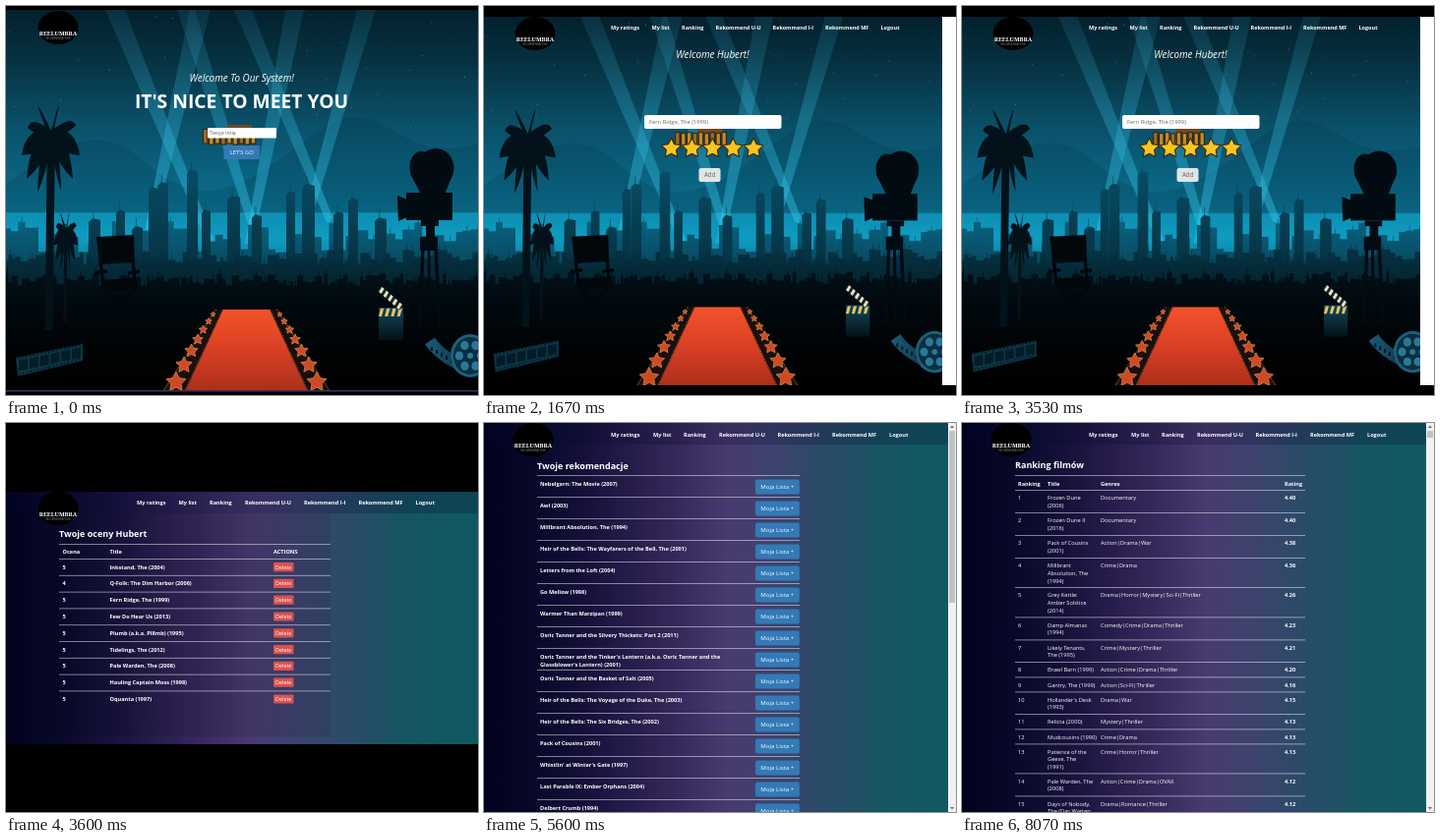
Write an HTML page with a canvas that moves like this. It is 480x396 px and loops after 8390 ms.

```html
<!DOCTYPE html>
<html lang="en">
<head>
<meta charset="utf-8">
<title>Film recommender demo</title>
<style>
html, body { margin: 0; width: 100%; height: 100%; overflow: hidden; background: #000; }
canvas { display: block; }
</style>
</head>
<body>
<canvas id="stage" width="480" height="396"></canvas>
<script>
const ctx = document.getElementById('stage').getContext('2d');
const LOOP = 8390;
const SANS = '"Open Sans", "Noto Sans", sans-serif';
const SERIF = '"Noto Serif", "Liberation Serif", serif';
const BLUE = '#337ab7';

function rect(x, y, w, h, color) {
  ctx.fillStyle = color;
  ctx.fillRect(x, y, w, h);
}

function box(x, y, w, h, r, color) {
  ctx.fillStyle = color;
  ctx.beginPath();
  ctx.roundRect(x, y, w, h, r);
  ctx.fill();
}

function poly(pts, color) {
  ctx.fillStyle = color;
  ctx.beginPath();
  for (let i = 0; i < pts.length; i += 2) ctx.lineTo(pts[i], pts[i + 1]);
  ctx.closePath();
  ctx.fill();
}

function disc(x, y, rx, ry, color) {
  ctx.fillStyle = color;
  ctx.beginPath();
  ctx.ellipse(x, y, rx, ry, 0, 0, 7);
  ctx.fill();
}

function line(pts, width, color) {
  ctx.strokeStyle = color;
  ctx.lineWidth = width;
  ctx.beginPath();
  for (let i = 0; i < pts.length; i += 2) ctx.lineTo(pts[i], pts[i + 1]);
  ctx.stroke();
}

function text(str, x, y, size, style = '', color = '#fff', align = 'left', family = SANS) {
  ctx.font = `${style} ${size}px ${family}`;
  ctx.fillStyle = color;
  ctx.textAlign = align;
  ctx.fillText(str, x, y);
}

function ramp(x0, y0, x1, y1, stops) {
  const g = ctx.createLinearGradient(x0, y0, x1, y1);
  for (const [at, color] of stops) g.addColorStop(at, color);
  return g;
}

function star(x, y, r, color, edge, width) {
  ctx.beginPath();
  for (let i = 0; i < 10; i++) {
    const a = i * Math.PI / 5 - Math.PI / 2, d = i % 2 ? r * 0.5 : r;
    ctx.lineTo(x + d * Math.cos(a), y + d * Math.sin(a));
  }
  ctx.closePath();
  ctx.lineJoin = 'round';
  ctx.fillStyle = color;
  ctx.strokeStyle = edge;
  ctx.lineWidth = width;
  ctx.fill();
  ctx.stroke();
}

function rng(seed) {
  return () => (seed = seed * 16807 % 2147483647) / 2147483647;
}

function logo(x, y) {
  disc(x, y, 20.5, 17, '#000');
  text('REELUMBRA', x, y + 8, 5.9, 'bold', '#fff', 'center', SERIF);
  text('RECOMMENDATIONS', x, y + 12, 2.6, '', '#888', 'center');
}

function nav(xs, y, size) {
  const items = ['My ratings', 'My list', 'Ranking', 'Rekommend U-U',
    'Rekommend I-I', 'Rekommend MF', 'Logout'];
  items.forEach((s, i) => text(s, xs[i], y, size, 'bold'));
}

// ---- night city backdrop, in 480 x 396 coordinates ----

function sky() {
  rect(0, 4, 480, 388, ramp(0, 4, 0, 392, [[0, '#03202d'], [0.12, '#06303f'],
    [0.3, '#0a5069'], [0.53, '#0b7191'], [0.534, '#0d8fb3'], [0.6, '#0f9cc1'],
    [0.68, '#0b7896'], [1, '#000']]));
  const r = rng(77);
  for (let i = 0; i < 45; i++)
    rect(r() * 480, 8 + r() * 120, 0.9, 0.9, `rgba(170,220,235,${0.15 + r() * 0.5})`);

  ctx.fillStyle = 'rgba(3,50,70,.22)';
  ctx.beginPath();
  ctx.moveTo(0, 180);
  ctx.bezierCurveTo(25, 165, 60, 133, 100, 137);
  ctx.bezierCurveTo(140, 142, 150, 185, 205, 188);
  ctx.bezierCurveTo(265, 185, 310, 118, 352, 113);
  ctx.bezierCurveTo(395, 112, 410, 160, 480, 140);
  ctx.lineTo(480, 210);
  ctx.lineTo(0, 210);
  ctx.fill();
}

function beams() {
  const light = ramp(0, 4, 0, 245, [[0, 'rgba(50,160,195,.13)'],
    [0.4, 'rgba(50,180,215,.3)'], [1, 'rgba(50,200,235,.5)']]);
  const rays = [[101, 121, 208, 240], [187, 208, 143, 238], [174, 192, 256, 240],
    [284, 303, 247, 242], [232, 250, 330, 220], [357, 376, 306, 218]];
  for (const [a, b, x, y] of rays) poly([a, 4, b, 4, x + 4, y, x - 4, y], light);
}

// A jagged row of roofs from edge to edge.
function roofs(seed, width, top, drop, color) {
  const r = rng(seed);
  for (let x = 0; x < 480;) {
    const w = width * (0.4 + r()), y = top + r() * drop;
    rect(x, y, w + 0.4, 300 - y, color);
    if (r() > 0.6) rect(x + w / 2, y - 5, 0.8, 6, color);
    x += w;
  }
}

function skyline() {
  roofs(2024, 11, 219, 32, ramp(0, 210, 0, 270, [[0, '#0a6684'], [1, '#07465d']]));
  const tall = [[84, 12, 216], [112, 9, 207], [128, 11, 224], [145, 9, 184], [154, 11, 179],
    [184, 11, 166], [199, 9, 207], [225, 13, 193], [250, 10, 212], [285, 9, 188],
    [301, 13, 181], [333, 10, 209], [348, 10, 195], [375, 12, 215]];
  const wall = ramp(0, 165, 0, 275, [[0, '#084c66'], [1, '#05303f']]);
  for (const [x, w, top] of tall) {
    poly([x, 290, x, top + 4, x + w * 0.35, top, x + w, top + 2, x + w, 290], wall);
    line([x + w * 0.4, top, x + w * 0.4, top - 8], 0.7, '#084c66');
  }
  roofs(515, 6, 247, 16, ramp(0, 245, 0, 290, [[0, '#053444'], [1, '#04212d']]));
  roofs(99, 5, 272, 13, ramp(0, 270, 0, 300, [[0, '#021119'], [1, '#010a10']]));
  rect(0, 296, 480, 96, ramp(0, 296, 0, 392, [[0, '#010a10'], [0.5, '#010406'], [1, '#000']]));
}

function palm(x, y, sx, sy, trunk) {
  const dark = '#03121a';
  ctx.save();
  ctx.translate(x, y);
  ctx.scale(sx, sy);
  poly([-4, 0, 4, 0, 1.5, trunk, -6.5, trunk], dark);
  const tips = [-30, 22, -25, 46, -14, 60, -24, -6, -14, -28, 8, -29, 25, -8, 29, 22, 22, 46, 10, 58];
  ctx.fillStyle = dark;
  for (let i = 0; i < tips.length; i += 2) {
    const a = tips[i], b = tips[i + 1];
    ctx.beginPath();
    ctx.moveTo(0, -3);
    ctx.quadraticCurveTo(a * 0.85, b * 0.4 - 17, a, b);
    ctx.quadraticCurveTo(a * 0.4, b * 0.55 + 8, 0, 12);
    ctx.fill();
  }
  ctx.restore();
}

function chair() {
  const c = '#01070b';
  poly([92, 235, 130, 233, 131, 261, 95, 263], c);
  line([96, 260, 99, 284], 3.4, c);
  line([129, 258, 131, 284], 3.4, c);
  line([90, 272, 103, 270], 3.5, c);
  line([124, 272, 136, 270], 3.5, c);
  poly([96, 279, 133, 277, 134, 288, 98, 290], c);
  line([100, 288, 130, 320], 2.8, c);
  line([131, 288, 101, 320], 2.8, c);
}

function camera() {
  const c = '#020b12';
  disc(437, 165, 18.5, 20, c);
  disc(422, 164, 11.5, 16, c);
  poly([411, 170, 454, 172, 446, 192, 422, 192], c);
  rect(407, 190, 47, 28, c);
  poly([398, 193, 408, 197, 408, 215, 399, 219], c);
  rect(422, 218, 18, 6, c);
  rect(427, 222, 9, 16, c);
  rect(421, 235, 18, 14, c);
  line([424, 246, 421, 326], 3.5, c);
  line([430, 246, 431, 326], 3, c);
  line([437, 246, 441, 326], 3.5, c);
}

function props() {
  // clapperboard
  rect(379, 307, 25, 33, ramp(0, 307, 0, 340, [[0, '#12485c'], [1, '#041117']]));
  for (let i = 0; i < 4; i++) {
    const x = 379 + i * 6.2;
    poly([x + 2, 308, x + 5.2, 308, x + 3, 316, x, 316], '#e6c463');
  }
  ctx.save();
  ctx.translate(381, 286);
  ctx.rotate(0.72);
  rect(0, -1, 30, 6, '#17242a');
  for (let i = 0; i < 5; i++) poly([i * 6 + 1, -1, i * 6 + 4, -1, i * 6 + 5, 5, i * 6 + 2, 5], '#ebe4c4');
  ctx.restore();

  // film strip
  poly([10, 358, 78, 344, 78, 361, 12, 377], '#0b3747');
  for (let i = 0; i < 6; i++) {
    const x = 13 + i * 10.8, y = 361 - i * 2.3;
    poly([x, y, x + 9, y - 1.9, x + 9, y + 8.5, x, y + 10.5], '#041c27');
  }
  for (let i = 0; i < 17; i++) {
    rect(12 + i * 3.9, 358.3 - i * 0.83, 1.6, 1.3, '#02121a');
    rect(13 + i * 3.8, 374 - i * 0.92, 1.6, 1.3, '#02121a');
  }

  // film reel with a loose end
  ctx.strokeStyle = ramp(428, 0, 470, 0, [[0, '#1a5a76'], [1, '#0c3040']]);
  ctx.lineWidth = 12;
  ctx.beginPath();
  ctx.moveTo(431, 341);
  ctx.quadraticCurveTo(446, 362, 480, 372);
  ctx.stroke();
  for (let i = 0; i < 8; i++) rect(432 + i * 5, 347 + i * 3, 2, 4, '#04161f');
  disc(472, 356, 20, 22, '#1c5f7a');
  disc(472, 356, 17, 19, '#0a2f40');
  for (let i = 0; i < 6; i++)
    disc(472 + 11 * Math.cos(i * 1.047), 356 + 12 * Math.sin(i * 1.047), 4.2, 4.6, '#2b7896');
  disc(472, 356, 3, 3, '#2b7896');
}

function carpet() {
  const edge = '#1a0f10', gold = '#a5602b';
  for (const m of [1, -1]) {
    const X = d => 244.5 - m * d;
    poly([X(23), 309, X(31), 309, X(84), 391, X(61), 391], edge);
    ctx.setLineDash([1.2, 1.2]);
    line([X(31), 309, X(84), 391], 1.2, gold);
    line([X(24), 309, X(62), 391], 1.2, gold);
    ctx.setLineDash([]);
    const spots = [[71.5, 383, 10.5], [63.5, 365.5, 8.6], [56, 351, 7], [49.5, 339.5, 5.6],
      [44, 329.5, 4.4], [38.5, 321, 3.4], [34, 314, 2.6]];
    for (const [d, y, r] of spots) star(X(d), y, r, '#cf4a24', '#d98a48', 0.8);
  }
  poly([221, 309, 268, 309, 306, 391, 183, 391],
    ramp(0, 309, 0, 391, [[0, '#f4522a'], [0.5, '#d84024'], [1, '#ae2f1a']]));
}

function sign() {
  rect(224, 121, 26, 5, '#6d4a25');
  for (let i = 0; i < 9; i++) {
    rect(200 + i * 6.1, 125 + i % 2, 5.6, 15.5, '#33230f');
    rect(201 + i * 6.1, 126 + i % 2, 3.4, 13.5, i % 3 ? '#c48a2a' : '#a06a22');
  }
}

function city() {
  ctx.save();
  ctx.beginPath();
  ctx.rect(0, 4, 480, 387);
  ctx.clip();
  sky();
  beams();
  skyline();
  palm(46, 130, 1, 1, 200);
  palm(61, 229, 0.42, 0.66, 140);
  chair();
  camera();
  props();
  carpet();
  sign();
  ctx.restore();
}

// ---- pages ----

function welcome() {
  city();
  rect(0, 391, 480, 1.6, '#3a2f63');
  logo(53, 22);
  text('Welcome To Our System!', 239.7, 77, 9.9, 'italic', '#fff', 'center');
  text("IT'S NICE TO MEET YOU", 239.5, 104, 19.3, 'bold', '#fff', 'center');
  box(205, 124, 70, 10.5, 1, '#fff');
  text('Twoje imię', 207, 131, 5.4, '', '#666');
  box(221.5, 142, 36.5, 14, 1.5, BLUE);
  text("LET'S GO", 239.7, 151, 5.8, '500', '#fff', 'center');
}

function rate() {
  ctx.save();
  ctx.translate(0, 11 - 4 * 0.969);
  ctx.scale(466 / 480, 0.969);
  city();
  ctx.restore();
  rect(466, 11, 14, 375, '#fff');
  logo(52, 28);
  nav([129, 170.5, 201, 235.5, 293.5, 347, 403.5], 23.5, 5.5);
  text('Welcome Hubert!', 232.5, 53, 9.9, 'italic', '#fff', 'center');
  box(163, 111, 139.5, 14, 2, '#fff');
  text('Fern Ridge, The (1999)', 168, 120, 5.8, '', '#666');
  for (let i = 0; i < 5; i++) star(190.5 + i * 20.9, 145, 10.6, '#f8c51f', '#3b2a12', 1.1);
  box(218.5, 165, 22, 14, 2, '#e2e4e5');
  text('Add', 229.7, 174.2, 6.2, '', '#666', 'center');
}

function backdrop(y, h, w) {
  rect(0, y, w, h, ramp(0, 0, 480, 0, [[0, '#02021f'], [0.1, '#070728'], [0.22, '#16113b'],
    [0.4, '#35275a'], [0.52, '#493a6f'], [0.6, '#3f416e'], [0.72, '#2b4b68'],
    [0.85, '#155561'], [1, '#0f5961']]));
  rect(0, y, w, 22, 'rgba(5,10,50,.25)');
}

function rule(y, right) {
  rect(54, y, right - 54, 0.8, 'rgba(255,255,255,.6)');
}

function scrollbar(thumb) {
  rect(472, 0, 8, 396, '#f1f1f1');
  rect(473, 8, 6, thumb, '#c1c1c1');
  poly([474, 5, 478, 5, 476, 2.5], '#666');
  poly([474, 391, 478, 391, 476, 393.5], '#666');
}

const rated = [
  [5, 'Inkstand, The (2004)'], [4, 'Q-Folk: The Dim Harbor (2006)'], [5, 'Fern Ridge, The (1999)'],
  [5, 'Few Do Hear Us (2013)'], [5, 'Plumb (a.k.a. Pl8mb) (1995)'], [5, 'Tidelings, The (2012)'],
  [5, 'Pale Warden, The (2008)'], [5, 'Hauling Captain Moss (1998)'], [5, 'Oquanta (1997)']
];

function ratings() {
  backdrop(70, 257, 480);
  rect(48, 92, 282, 227, 'rgba(0,0,20,.09)');
  logo(53, 87);
  nav([133, 175.5, 207, 243, 303, 358.5, 416.5], 83, 5.6);
  text('Twoje oceny Hubert', 54, 115.5, 9, 'bold');
  rule(123, 330);
  text('Ocena', 57.5, 133, 5.6, 'bold');
  text('Title', 105.5, 133, 5.6, 'bold');
  text('ACTIONS', 272, 133, 5.6, 'bold');
  rated.forEach(([score, title], i) => {
    const y = 146.5 + i * 16.8;
    rule(y - 8.4, 330);
    text(score, 57.5, y + 2, 5.6, 'bold');
    text(title, 105.5, y + 2, 5.6, 'bold');
    box(272, y - 4.5, 20.5, 9.2, 1, '#d9534f');
    text('Delete', 282.2, y + 2, 5.4, '', '#fff', 'center');
  });
}

const picks = [
  'Nebelgarn: The Movie (2007)', 'Awl (2003)', 'Millbrant Absolution, The (1994)',
  'Heir of the Bells: The Wayfarers of the Bell, The (2001)', 'Letters from the Loft (2004)',
  'Go Mellow (1998)', 'Warmer Than Marzipan (1999)',
  'Osric Tanner and the Silvery Thickets: Part 2 (2011)',
  "Osric Tanner and the Tinker's Lantern (a.k.a. Osric Tanner and the|Glassblower's Lantern) (2001)",
  'Osric Tanner and the Basket of Salt (2005)', 'Heir of the Bells: The Voyage of the Duke, The (2003)',
  'Heir of the Bells: The Six Bridges, The (2002)', 'Pack of Cousins (2001)',
  "Whistlin' at Winter's Gate (1997)", 'Last Parable IX: Ember Orphans (2004)', 'Delbert Crumb (1994)'
];

function recommended() {
  backdrop(0, 396, 472);
  logo(50, 17);
  nav([129, 172, 203, 239, 298.5, 354, 412], 14, 5.6);
  text('Twoje rekomendacje', 54, 46.5, 9, 'bold');
  picks.forEach((title, i) => {
    const y = 53 + i * 22;
    rule(y, 321);
    title.split('|').forEach((s, k) => text(s, 57, y + 11 + k * 7.7, 5.6, 'bold'));
    box(276, y + 4.6, 44.8, 15, 2, BLUE);
    text('Moja Lista +', 298.3, y + 14.2, 6.1, '', '#fff', 'center');
  });
  scrollbar(175);
}

const top15 = [
  [68, 'Frozen Dune|(2006)', 'Documentary', '4.40'],
  [91, 'Frozen Dune II|(2016)', 'Documentary', '4.40'],
  [114, 'Pack of Cousins|(2001)', 'Action|Drama|War', '4.38'],
  [137, 'Millbrant|Absolution, The|(1994)', 'Crime|Drama', '4.36'],
  [167, 'Grey Kettle:|Amber Solstice|(2014)', 'Drama|Horror|Mystery|Sci-Fi|Thriller', '4.26'],
  [197.5, 'Damp Almanac|(1994)', 'Comedy|Crime|Drama|Thriller', '4.23'],
  [220.5, 'Likely Tenants,|The (1995)', 'Crime|Mystery|Thriller', '4.21'],
  [243, 'Brawl Barn (1999)', 'Action|Crime|Drama|Thriller', '4.20'],
  [258.5, 'Gantry, The (1999)', 'Action|Sci-Fi|Thriller', '4.16'],
  [273.5, "Hollander's Desk|(1993)", 'Drama|War', '4.15'],
  [296, 'Relicta (2000)', 'Mystery|Thriller', '4.13'],
  [311.5, 'Mudcousins (1990)', 'Crime|Drama', '4.13'],
  [326.5, 'Patience of the|Geese, The|(1991)', 'Crime|Horror|Thriller', '4.13'],
  [356.5, 'Pale Warden, The|(2008)', 'Action|Crime|Drama|OVAX', '4.12'],
  [379.5, 'Days of Nobody,|The (Das Warten', 'Drama|Romance|Thriller', '4.12']
];

function ranking() {
  backdrop(0, 396, 472);
  logo(50, 17);
  nav([129, 172, 203, 239, 298.5, 354, 412], 14, 5.6);
  text('Ranking filmów', 54, 46, 9, 'bold');
  rule(53, 349);
  text('Ranking', 57, 63.5, 5.6, 'bold');
  text('Title', 87, 63.5, 5.6, 'bold');
  text('Genres', 141, 63.5, 5.6, 'bold');
  text('Rating', 328, 63.5, 5.6, 'bold');
  top15.forEach(([y, title, genres, score], i) => {
    rule(y, 349);
    const base = y + 10.2;
    text(i + 1, 57, base, 5.7, '500');
    title.split('|').forEach((s, k) => text(s, 87, base + k * 7.7, 5.7, '500'));
    text(genres, 141, base, 5.7, '500');
    text(score, 328, base, 5.6, 'bold');
  });
  scrollbar(7);
}

const scenes = [[0, welcome], [1470, rate], [3600, ratings], [5000, recommended], [7130, ranking]];
const start = performance.now();
let shown = null;

function tick() {
  const t = (performance.now() - start) % LOOP;
  const page = scenes.filter(s => s[0] <= t).pop()[1];
  if (page !== shown) {
    rect(0, 0, 480, 396, '#000');
    page();
    shown = page;
  }
  requestAnimationFrame(tick);
}
tick();
</script>
</body>
</html>
```
